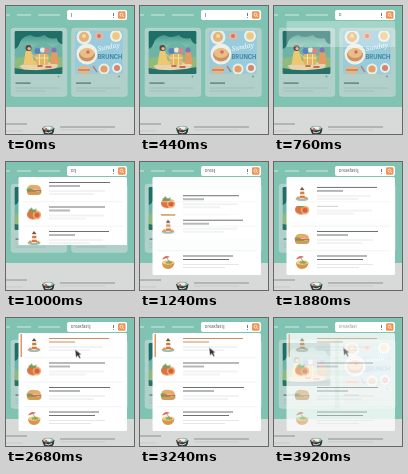
An HTML page for the animation above (3.96 s loop, 128x128 px).

```html
<!DOCTYPE html>
<html lang="en">
<head>
<meta charset="utf-8">
<style>
  html, body { margin: 0; width: 100%; height: 100%; overflow: hidden; background: #80c3b2; }
  svg { display: block; width: 100vw; height: 100vh; }
  text { font-family: Inter, Arial, sans-serif; }
  .anim { animation: 3960ms linear infinite; }

  #panel { animation-name: fade; }
  @keyframes fade {
    0%, 18% { opacity: 0; }
    19.2% { opacity: .3; }
    22%, 97% { opacity: 1; }
    99% { opacity: .8; }
    100% { opacity: .6; }
  }

  #sheet { animation-name: grow; }
  @keyframes grow {
    0%, 18% { clip-path: inset(0 0 76px 0); }
    19.2% { clip-path: inset(0 0 73px 0); }
    25.25% { clip-path: inset(0 0 31px 0); }
    30%, 100% { clip-path: inset(0); }
  }

  #rows { animation-name: rows; }
  @keyframes rows {
    0%, 19.5% { opacity: 0; }
    23%, 97% { opacity: 1; }
    99% { opacity: .65; }
    100% { opacity: .5; }
  }

  #sandwich { animation-name: sandwich; }
  @keyframes sandwich {
    0%, 28% { transform: translateY(0); animation-timing-function: ease-in-out; }
    35%, 100% { transform: translateY(49px); }
  }
  #tomato { animation-name: tomato; }
  @keyframes tomato {
    0%, 28% { transform: translateY(24.5px); animation-timing-function: ease-in-out; }
    35%, 43.5% { transform: translateY(0); animation-timing-function: ease-in-out; }
    49.3%, 100% { transform: translateY(24.5px); }
  }
  #tower { animation-name: tower; }
  @keyframes tower {
    0%, 28% { transform: translateY(49px); animation-timing-function: ease-in-out; }
    35%, 43.5% { transform: translateY(24.5px); animation-timing-function: ease-in-out; }
    49.3%, 100% { transform: translateY(0); }
  }
  #coconut { transform: translateY(73.5px); }

  .title { fill: #6c7072; }
  #hover { animation-name: hover; }
  @keyframes hover { 0%, 62% { opacity: 0; } 64%, 100% { opacity: 1; } }
  #tower .title { animation-name: ink; }
  @keyframes ink { 0%, 62% { fill: #6c7072; } 64%, 100% { fill: #cf8a5e; } }

  #mouse { animation-name: mouse; }
  @keyframes mouse {
    0%, 55.5% { transform: translate(99px, 78px); opacity: 0; }
    57% { transform: translate(99px, 78px); opacity: 1; animation-timing-function: ease-in-out; }
    66%, 73% { transform: translate(69px, 31.5px); opacity: 1; }
    80%, 97% { transform: translate(69px, 29.5px); opacity: 1; }
    100% { transform: translate(69px, 29.5px); opacity: .5; }
  }

  #query { animation-name: query; }
  @keyframes query { 0%, 97% { opacity: 1; } 99% { opacity: .65; } 100% { opacity: .5; } }
  #cover { animation: type 3960ms step-end infinite; }
  @keyframes type {
    0% { transform: translateX(0); }
    18.2% { transform: translateX(2.4px); }
    22.5% { transform: translateX(3.9px); }
    26.5% { transform: translateX(6.2px); }
    29% { transform: translateX(8.5px); }
    31.5% { transform: translateX(10.7px); }
    34% { transform: translateX(12.1px); }
    36.2% { transform: translateX(14.3px); }
    39% { transform: translateX(16.5px); }
    42%, 100% { transform: translateX(18.3px); }
  }
  #caret { animation: blink 792ms step-end infinite; }
  @keyframes blink { 0% { opacity: 1; } 60% { opacity: 0; } }
</style>
</head>
<body>
<svg viewBox="0 0 128 128" preserveAspectRatio="none">
  <defs>
    <clipPath id="pic"><rect width="48" height="43" rx="1.5"/></clipPath>
    <clipPath id="field"><rect x="61" y="4" width="44" height="10"/></clipPath>
    <linearGradient id="sky" x2="0" y2="1">
      <stop stop-color="#2f8a82"/><stop offset=".4" stop-color="#8cc8b4"/><stop offset="1" stop-color="#4f9a86"/>
    </linearGradient>
    <g id="card">
      <rect x="-3.3" y="-2.7" width="55.5" height="68" rx="2.5" fill="#b1d0c9" stroke="#bfdad4" stroke-width=".6"/>
      <circle cx="44" cy="45.5" r="1" fill="#7f9c95"/>
      <rect x="1" y="51.5" width="15" height="1.2" fill="#55706a"/>
      <path d="M1 57H45M1 60H31" stroke="#97b8b0" stroke-width=".7"/>
    </g>
  </defs>

  <rect width="128" height="128" fill="#80c3b2"/>
  <rect y="101" width="128" height="27" fill="#d8d9d9"/>
  <path d="M0 9H4M11 9H25M32 9H54" stroke="#cfe9e2" stroke-width="1.1"/>

  <g transform="translate(8.5 25)">
    <use href="#card"/>
    <g clip-path="url(#pic)">
      <rect width="48" height="43" fill="url(#sky)"/>
      <path d="M0 18L9 12L17 17L28 10L38 16L48 11V26H0Z" fill="#6db3a6"/>
      <path d="M0 0H48V13Q44 13 42 7Q35 9 30 4Q22 8 16 4Q9 5 6 10Q4 17 0 18Z" fill="#1f6e68"/>
      <path d="M0 28Q24 20 48 27V43H0Z" fill="#8fba7c"/>
      <path d="M5 35Q24 26 44 34L40 39H9Z" fill="#e6d3ae"/>
      <path d="M0 37Q24 42 48 36V43H0Z" fill="#277169"/>
      <path d="M9 34L11 21Q14 17 17 21L19 29L23 34Z" fill="#ecc873"/>
      <circle cx="14" cy="17" r="3" fill="#5c4542"/>
      <circle cx="14.6" cy="17.6" r="1.7" fill="#e9b78f"/>
      <path d="M17 23L22 27" stroke="#e9b78f" stroke-width="1.5"/>
      <rect x="21" y="23" width="13" height="11" rx="2.5" fill="#e0b664"/>
      <path d="M21 27H34M25 23V34M30 23V34" stroke="#f5e0a6"/>
      <circle cx="23" cy="20" r="3" fill="#5d7fc0"/>
      <circle cx="28" cy="19" r="2.5" fill="#f2e6cf"/>
      <circle cx="32.5" cy="20" r="2.7" fill="#de8189"/>
      <path d="M36 33L37 22Q40 18 43 23L44 33Z" fill="#e59b63"/>
      <circle cx="39.5" cy="19" r="2.5" fill="#8175b4"/>
      <path d="M23 35H28M31 36H37" stroke="#c9695b" stroke-width="2"/>
    </g>
  </g>

  <g transform="translate(69 25)">
    <use href="#card"/>
    <g clip-path="url(#pic)">
      <rect width="48" height="43" fill="#98cbdc"/>
      <circle cx="9" cy="6" r="7.5" fill="#e7eee9"/>
      <circle cx="9" cy="6" r="5" fill="#e3b27d"/>
      <circle cx="9" cy="5" r="2" fill="#f4df8c"/>
      <circle cx="12" cy="23" r="10.5" fill="#eef0e7"/>
      <ellipse cx="12" cy="24" rx="8" ry="6.5" fill="#cc9267"/>
      <ellipse cx="12" cy="22" rx="7" ry="5" fill="#e8bf86"/>
      <circle cx="13" cy="21" r="1.8" fill="#d96a5f"/>
      <ellipse cx="24" cy="5" rx="4.5" ry="3.5" fill="#eeb59a"/>
      <circle cx="24" cy="5" r="2" fill="#d57466"/>
      <circle cx="41" cy="5" r="6" fill="#edf0e6"/>
      <circle cx="41" cy="5" r="3.8" fill="#efc780"/>
      <ellipse cx="9" cy="39" rx="7" ry="4" fill="#e5b785"/>
      <path d="M3 39H15M18 35L22 41" stroke="#c77b65" stroke-width="1.4"/>
      <circle cx="29" cy="38" r="5.5" fill="#eceee5"/>
      <circle cx="29" cy="38" r="3.6" fill="#e0a06c"/>
      <circle cx="42" cy="37" r="5" fill="#e6efe6"/>
      <circle cx="42" cy="37" r="3" fill="#d88370"/>
      <text x="23" y="20" font-size="6.6" font-style="italic" style="font-family:'Noto Serif',serif" fill="#fafcfa" transform="rotate(-10 23 20)">Sunday</text>
      <text x="22.5" y="27.5" font-size="5.8" font-weight="700" fill="#4185a0">BRUNCH</text>
    </g>
  </g>

  <path d="M0 118H21M54 121H109" stroke="#85898a" stroke-width=".9"/>
  <path d="M0 125H16M54 124H99" stroke="#bfc1c1" stroke-width=".7"/>
  <path d="M36 122H48.5Q48 128 45 129H39Q37 127 36 122Z" fill="#2c3a38"/>
  <ellipse cx="42.2" cy="122" rx="5.6" ry="2.3" fill="#8fae9b"/>
  <path d="M38 122Q42 119.5 46 121.5L44 124Q41 122 39 124Z" fill="#eceeea"/>
  <circle cx="40" cy="123.3" r="1.3" fill="#c8665d"/>
  <path d="M39 126Q42 128 46 125.5" fill="none" stroke="#e1e4e0" stroke-width="1"/>

  <rect x="61" y="4" width="60" height="10" rx="2" fill="#fff"/>
  <g id="query" class="anim">
    <text x="65" y="10.3" font-size="4" fill="#565d5b">breakfast</text>
  </g>
  <g clip-path="url(#field)">
    <g id="cover">
      <rect x="65" y="5" width="40" height="8" fill="#fff"/>
      <rect id="caret" x="65.3" y="7" width=".6" height="4" fill="#626967"/>
    </g>
  </g>
  <path d="M107.5 7V10M107.5 11V11.8" stroke="#777" stroke-width="1"/>
  <rect x="112" y="5.2" width="7.5" height="7.5" rx="1.3" fill="#ec9558"/>
  <circle cx="115.5" cy="8.6" r="1.5" fill="none" stroke="#fff" stroke-width=".7"/>
  <path d="M116.7 9.8L118 11" stroke="#fff" stroke-width=".7"/>

  <g id="panel" class="anim">
    <g id="sheet" class="anim">
      <rect x="12.5" y="15" width="108.5" height="98" rx="1.5" fill="#fcfdfd"/>
      <g id="rows" class="anim">
        <g id="sandwich" class="anim">
          <rect x="14" y="16" width="105" height="23" fill="#fff"/>
          <path d="M21 27Q22 22 29 23Q35 23 35 28Z" fill="#e1ad6b"/>
          <path d="M20.5 27Q24 25 28 28T36 28L35 30H21Z" fill="#77a657"/>
          <path d="M22 28.5H35" stroke="#d76853" stroke-width="1.3"/>
          <path d="M21 30H35.5Q35 33 32 33H24Q21 33 21 30Z" fill="#d69a57"/>
          <path class="title" d="M43 20H104V21H43ZM43 23.5H74V24.5H43Z"/>
          <path d="M43 29H99M43 32H88" stroke="#e2e4e4" stroke-width=".9"/>
        </g>
        <g id="tomato" class="anim">
          <rect x="14" y="16" width="105" height="23" fill="#fff"/>
          <ellipse cx="27" cy="28" rx="6" ry="5" fill="#dc7442"/>
          <circle cx="31" cy="28.5" r="4.2" fill="#efad65"/>
          <circle cx="31" cy="28.5" r="2.6" fill="#d75e43"/>
          <path d="M22 24L26 21L27 24L31 22L29 26Z" fill="#68a35c"/>
          <path class="title" d="M43 20H99V21H43ZM43 23.5H64V24.5H43Z"/>
          <path d="M43 29H98M43 32H80" stroke="#e2e4e4" stroke-width=".9"/>
        </g>
        <g id="tower" class="anim">
          <rect x="14" y="16" width="105" height="23" fill="#fff"/>
          <rect id="hover" class="anim" x="14.5" y="16" width="1.5" height="23" fill="#e8955c"/>
          <ellipse cx="28" cy="32" rx="6.5" ry="2" fill="#9dbeb9"/>
          <path d="M25.5 32L26.5 23H30L31 32Z" fill="#f0dfc5"/>
          <path d="M26.3 25H30.2L30.4 27H26.1ZM25.8 29H30.7L31 31H25.6Z" fill="#d57846"/>
          <path d="M25.8 23L28 20L30.5 23Z" fill="#74554a"/>
          <path d="M22 32L24 29L26 32ZM30 32L32 29.5L34.5 32Z" fill="#dc9a51"/>
          <path class="title anim" d="M43 20H103V21H43ZM43 23.5H69V24.5H43Z"/>
          <path d="M43 29H97M43 32H84" stroke="#e2e4e4" stroke-width=".9"/>
        </g>
        <g id="coconut">
          <rect x="14" y="16" width="105" height="23" fill="#fff"/>
          <path d="M22 27H34.5Q34 33.5 28 33.5T22 27Z" fill="#d9954d"/>
          <ellipse cx="28.2" cy="27" rx="6.2" ry="2.2" fill="#f0cf87"/>
          <ellipse cx="29" cy="27" rx="3.5" ry="1.2" fill="#83ad62"/>
          <path d="M30 27L26.5 22" stroke="#8e7656" stroke-width=".7"/>
          <path d="M22 24Q25 18.5 30 21.5Z" fill="#dc6959"/>
          <path class="title" d="M43 20H93V21H43ZM43 23.5H89V24.5H43Z"/>
          <path d="M43 29H99M43 32H85" stroke="#e2e4e4" stroke-width=".9"/>
        </g>
        <path d="M18 39.7H116M18 64.2H116M18 88.7H116" stroke="#eef0f0" stroke-width=".6"/>
      </g>
    </g>
  </g>

  <path id="mouse" class="anim" d="M0 0L1 8L2.8 6.3L4.4 9L5.8 8.2L4.2 5.6L6.5 5Z" fill="#303332" stroke="#fff" stroke-width=".4"/>
</svg>
</body>
</html>
```
